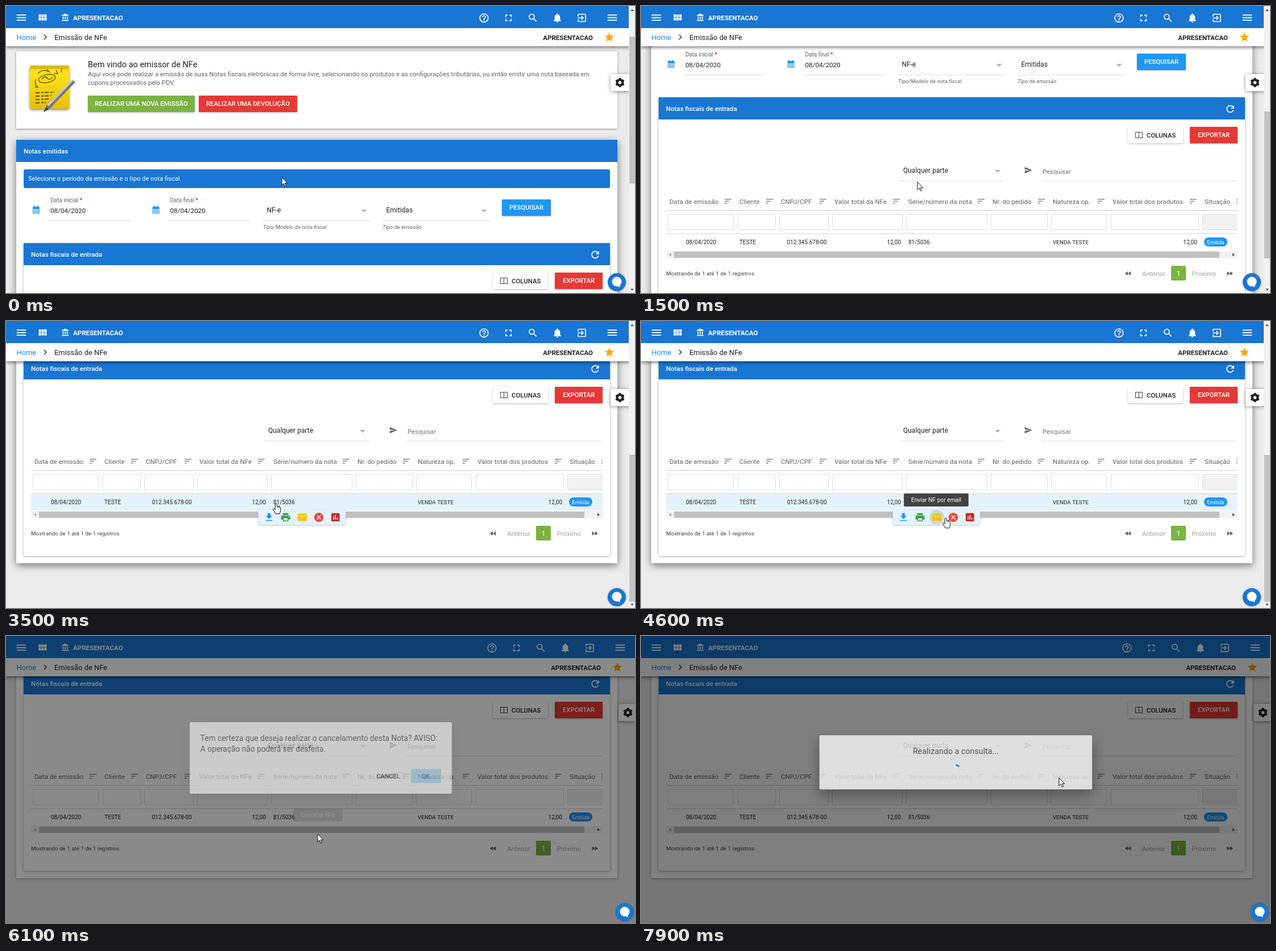
Animation of 1106 by 506 pixels, one loop 8 s. Source, as an HTML page with a canvas:

```html
<!DOCTYPE html>
<html lang="pt-BR">
<head>
<meta charset="utf-8">
<title>Emissão de NFe</title>
<style>
html, body { margin: 0; width: 100%; height: 100%; overflow: hidden; background: #ebebeb; }
canvas { display: block; }
</style>
</head>
<body>
<canvas id="stage" width="1106" height="506"></canvas>
<script>
const W = 1106, H = 506, LOOP = 8000, STEP = 100;
const stage = document.getElementById('stage').getContext('2d');
const layer = new OffscreenCanvas(W, H).getContext('2d');
let ctx = stage;
const BLUE = '#1976d2', SKY = '#2196f3', RED = '#e53935', GREEN = '#7cb342';
const INK = '#212121', GREY = '#616161', PALE = '#e3f2fd', LINE = '#dcdcdc';
const COMPANY = 'APRESENTACAO';

// 24-unit icon outlines
const ICONS = {
  menu: 'M3 18h18v-2H3zM3 13h18v-2H3zM3 6v2h18V6z',
  modules: 'M4 11h5V5H4zM4 18h5v-6H4zM10 18h5v-6h-5zM16 18h5v-6h-5zM10 11h5V5h-5zM16 5v6h5V5z',
  bank: 'M4 10v7h3v-7zM10 10v7h3v-7zM2 22h19v-3H2zM16 10v7h3v-7zM11.5 1L2 6v2h19V6z',
  help: 'M11 18h2v-2h-2v2zm1-16C6.48 2 2 6.48 2 12s4.48 10 10 10 10-4.48 10-10S17.52 2 12 2zm0 18c-4.41 0-8-3.59-8-8s3.59-8 8-8 8 3.59 8 8-3.59 8-8 8zm0-14c-2.21 0-4 1.79-4 4h2c0-1.1.9-2 2-2s2 .9 2 2c0 2-3 1.75-3 5h2c0-2.25 3-2.5 3-5 0-2.21-1.79-4-4-4z',
  full: 'M7 14H5v5h5v-2H7zM5 10h2V7h3V5H5zM17 17h-3v2h5v-5h-2zM14 5v2h3v3h2V5z',
  search: 'M15.5 14h-.79l-.28-.27C15.41 12.59 16 11.11 16 9.5 16 5.91 13.09 3 9.5 3S3 5.91 3 9.5 5.91 16 9.5 16c1.61 0 3.09-.59 4.23-1.57l.27.28v.79l5 4.99L20.49 19zM9.5 14C7.01 14 5 11.99 5 9.5S7.01 5 9.5 5 14 7.01 14 9.5 11.99 14 9.5 14z',
  bell: 'M12 22c1.1 0 2-.9 2-2h-4c0 1.1.89 2 2 2zm6-6v-5c0-3.07-1.64-5.64-4.5-6.32V4c0-.83-.67-1.5-1.5-1.5s-1.5.67-1.5 1.5v.68C7.63 5.36 6 7.92 6 11v5l-2 2v1h16v-1z',
  exit: 'M10.09 15.59L11.5 17l5-5-5-5-1.41 1.41L12.67 11H3v2h9.67zM19 3H5c-1.11 0-2 .9-2 2v4h2V5h14v14H5v-4H3v4c0 1.1.89 2 2 2h14c1.1 0 2-.9 2-2V5c0-1.1-.9-2-2-2z',
  chevron: 'M10 6L8.59 7.41 13.17 12l-4.58 4.59L10 18l6-6z',
  star: 'M12 17.27L18.18 21l-1.64-7.03L22 9.24l-7.19-.61L12 2 9.19 8.63 2 9.24l5.46 4.73L5.82 21z',
  refresh: 'M17.65 6.35C16.2 4.9 14.21 4 12 4c-4.42 0-7.99 3.58-7.99 8s3.57 8 7.99 8c3.73 0 6.84-2.55 7.73-6h-2.08c-.82 2.33-3.04 4-5.65 4-3.31 0-6-2.69-6-6s2.69-6 6-6c1.66 0 3.14.69 4.22 1.78L13 11h7V4z',
  send: 'M2 21L23 12 2 3v7l15 2-15 2z',
  download: 'M19 9h-4V3H9v6H5l7 7zM5 18v2h14v-2z',
  print: 'M19 8H5c-1.66 0-3 1.34-3 3v6h4v4h12v-4h4v-6c0-1.66-1.34-3-3-3zm-3 11H8v-5h8v5zm3-7c-.55 0-1-.45-1-1s.45-1 1-1 1 .45 1 1-.45 1-1 1zM18 3H6v4h12z',
  mail: 'M20 4H4c-1.1 0-2 .9-2 2v12c0 1.1.9 2 2 2h16c1.1 0 2-.9 2-2V6c0-1.1-.9-2-2-2zm0 4l-8 5-8-5V6l8 5 8-5z',
  cancel: 'M12 2C6.47 2 2 6.47 2 12s4.47 10 10 10 10-4.47 10-10S17.53 2 12 2zm5 13.59L15.59 17 12 13.41 8.41 17 7 15.59 10.59 12 7 8.41 8.41 7 12 10.59 15.59 7 17 8.41 13.41 12z',
  chart: 'M19 3H5c-1.1 0-2 .9-2 2v14c0 1.1.9 2 2 2h14c1.1 0 2-.9 2-2V5c0-1.1-.9-2-2-2zM9 17H7v-7h2zM13 17h-2V7h2zM17 17h-2v-4h2z',
  rewind: 'M12 18V6l-8.5 6zM20.5 18V6L12 12z',
  forward: 'M4 18l8.5-6L4 6zM12.5 6v12l8.5-6z'
};
for (const k in ICONS) ICONS[k] = new Path2D(ICONS[k]);
const ARROW = new Path2D('M0 0V14L3.2 11 5.6 16.2 7.7 15.2 5.4 10.3H9.8z');
const HAND = new Path2D('M-1.6 1.2Q0-1 1.6 1.2V6Q3.6 4.6 4 6.6 6 0 6 6.9 7.6 6 7.6 8.5V13Q7 15 6 18H-1Q-2 15-4.6 12-6.5 9-4.6 8.6L-1.6 10.5z');

function icon(name, x, y, size, color) {
  ctx.save();
  ctx.translate(x - size / 2, y - size / 2);
  ctx.scale(size / 24, size / 24);
  ctx.fillStyle = color;
  ctx.fill(ICONS[name], 'evenodd');
  ctx.restore();
}
function rect(x, y, x2, y2, color, r = 0) {
  ctx.fillStyle = color;
  ctx.beginPath();
  ctx.roundRect(x, y, x2 - x, y2 - y, r);
  ctx.fill();
}
function raised(x, y, x2, y2, color, r = 1, blur = 4, dy = 1, alpha = .35) {
  ctx.save();
  ctx.shadowColor = `rgba(0,0,0,${alpha})`;
  ctx.shadowBlur = blur;
  ctx.shadowOffsetY = dy;
  rect(x, y, x2, y2, color, r);
  ctx.restore();
}
function box(x, y, x2, y2, color) {
  ctx.strokeStyle = color;
  ctx.lineWidth = 1;
  ctx.strokeRect(x + .5, y + .5, x2 - x - 1, y2 - y - 1);
}
// y is the middle of the capitals
function text(s, x, y, size, color = INK, weight = 400, align = 'left') {
  ctx.font = `${weight} ${size}px Roboto, sans-serif`;
  ctx.textAlign = align;
  ctx.fillStyle = color;
  ctx.fillText(s, x, Math.round(y + size * .356));
}
function disc(x, y, r, color) {
  ctx.fillStyle = color;
  ctx.beginPath();
  ctx.arc(x, y, r, 0, 7);
  ctx.fill();
}
function poly(color, ...p) {
  ctx.fillStyle = color;
  ctx.beginPath();
  for (let i = 0; i < p.length; i += 2) ctx.lineTo(p[i], p[i + 1]);
  ctx.fill();
}
const caret = (x, y) => poly('#b5b5b5', x - 5, y - 2.5, x + 5, y - 2.5, x, y + 2.5);

// linear track through [time, ...values] keys
function track(keys, t) {
  let i = 0;
  while (i < keys.length - 1 && t >= keys[i + 1][0]) i++;
  const a = keys[i], b = keys[i + 1];
  if (!b || t <= a[0]) return a.slice(1);
  const p = (t - a[0]) / (b[0] - a[0]);
  return a.slice(1).map((v, k) => v + (b[k + 1] - v) * p);
}
const SCROLL = [[0, 0], [700, 0], [800, 18], [1200, 162], [1600, 288], [1700, 288], [1800, 354]];
const POINTER = [[0, 485, 302], [700, 485, 302], [1000, 486, 310], [1700, 486, 310], [1800, 486, 315],
  [2600, 486, 315], [2900, 477, 318], [3400, 477, 318], [3600, 473.5, 325], [3700, 473.5, 325],
  [4000, 463, 345], [4200, 482, 347], [4600, 536, 347], [5100, 548, 349], [6400, 548, 349],
  [6600, 629, 325], [6700, 629, 325], [7400, 735, 249.5]];
const SHADE = [[5800, 0], [5900, .02], [6000, .26], [6100, .46], [6200, .5]];
const ASK = [[5900, 0, .8], [6000, .2, .88], [6100, .56, .96], [6200, .88, .99], [6300, 1, 1],
  [7600, 1, 1], [7700, .6, .98], [7800, .1, .9], [7900, 0, .8]];

function notepad() {
  ctx.save();
  ctx.shadowColor = 'rgba(0,0,0,.5)';
  ctx.shadowBlur = 5;
  ctx.shadowOffsetY = 2;
  const g = ctx.createLinearGradient(0, 104, 0, 181);
  g.addColorStop(0, '#f5d90f');
  g.addColorStop(.2, '#fce21c');
  g.addColorStop(1, '#e8bd08');
  rect(42, 105, 111, 181, g, 2);
  ctx.restore();
  rect(43, 105, 110, 111, '#d8b90e', 1);
  ctx.strokeStyle = '#5d5310';
  ctx.lineWidth = 1.3;
  ctx.beginPath();
  ctx.ellipse(72, 128, 15, 7, -.2, 0, 6.3);
  ctx.moveTo(63, 129); ctx.quadraticCurveTo(70, 121, 73, 128); ctx.quadraticCurveTo(77, 132, 82, 125);
  ctx.moveTo(56, 119); ctx.quadraticCurveTo(65, 110, 76, 116); ctx.lineTo(72, 112);
  ctx.moveTo(88, 113); ctx.lineTo(91, 119); ctx.lineTo(84, 119);
  ctx.moveTo(98, 110); ctx.lineTo(97, 117);
  ctx.moveTo(53, 129); ctx.quadraticCurveTo(48, 137, 56, 143); ctx.lineTo(51, 143);
  ctx.stroke();
  ctx.lineWidth = 2;
  ctx.setLineDash([7, 3, 4, 2]);
  ctx.beginPath();
  for (let i = 0; i < 4; i++) { ctx.moveTo(52, 153 + i * 6); ctx.lineTo(85 - i * 5, 152 + i * 6); }
  ctx.stroke();
  ctx.setLineDash([]);
  poly('#74777a', 117, 130, 122, 134, 78, 180, 66, 187, 71, 175);
  poly('#c3c6c8', 116, 130, 119, 131, 75, 177, 72, 174);
  poly('#333', 71, 179, 75, 182, 66, 187);
}

function calendar(x, y) {
  rect(x - 6, y - 5, x + 6, y + 7, SKY, 1);
  for (let i = 0; i < 12; i++) {
    const cx = x - 5 + (i % 4) * 2.7, cy = y - 1 + (i / 4 | 0) * 2.6;
    rect(cx, cy, cx + 1.9, cy + 1.8, '#fff');
  }
  rect(x - 4, y - 7, x - 2, y - 3, SKY, 1);
  rect(x + 2, y - 7, x + 4, y - 3, SKY, 1);
}

function dateField(x, label) {
  calendar(x - 25, 359);
  text(label, x, 342.5, 10, GREY);
  const w = ctx.measureText(label + ' ').width;
  text('*', x + w, 342.5, 11, '#f00');
  text('08/04/2020', x, 361, 11.7);
  rect(x - 3, 378, x + 142, 379, LINE);
}
function select(x, x2, y, value, hint) {
  text(value, x + 6.5, y, 12);
  caret(x2 - 11.5, y + 1.5);
  rect(x, y + 18, x2, y + 19, LINE);
  if (hint) {
    ctx.font = 'italic 9.6px Roboto, sans-serif';
    ctx.textAlign = 'left';
    ctx.fillStyle = GREY;
    ctx.fillText(hint, x, y + 33);
  }
}
function button(x, y, x2, label, color) {
  raised(x, y, x2, y + 29, color, 1, 3, 1, .3);
  text(label, (x + x2) / 2, y + 14, 11.3, '#fff', 500, 'center');
}

const COLUMNS = [
  ['Data de emissão', 50, 147, 47, 163], ['Cliente', 173, 220, 170, 237], ['CNPJ/CPF', 246, 314, 243, 330],
  ['Valor total da NFe', 340, 443, 336, 460], ['Série/número da nota', 470, 592, 466, 609],
  ['Nr. do pedido', 618, 698, 615, 715], ['Natureza op.', 724, 803, 721, 819],
  ['Valor total dos produtos', 829, 965, 826, 981], ['Situação', 991, 1047, 987, 1060]
];

function table(lit) {
  ctx.save();
  ctx.beginPath();
  ctx.rect(44, 580, 1005, 140);
  ctx.clip();
  for (const [name, x, sx, x1, x2] of COLUMNS) {
    text(name, x, 601.5, 11.6, GREY);
    [12, 8, 4].forEach((w, i) => rect(sx, 597 + i * 3.5, sx + w, 598.3 + i * 3.5, '#757575'));
    if (x1 > 980) rect(x1, 624, x2, 652, '#f1f1f1');
    box(x1, 624, x2, 652, LINE);
  }
  rect(44, 617, 1050, 618, '#d0d0d0');
  rect(44, 658, 1050, 659, '#d4d4d4');
  if (lit) rect(44, 659, 1050, 688, PALE);
  const y = 673;
  text('08/04/2020', 79, y, 10);
  text('TESTE', 173, y, 10);
  text('012.345.678-00', 326.5, y, 10, INK, 400, 'right');
  text('12,00', 457, y, 10, INK, 400, 'right');
  text('81/5036', 470, y, 10);
  text('VENDA TESTE', 724, y, 9.9);
  text('12,00', 978, y, 10, INK, 400, 'right');
  rect(990, 665, 1031, 681, SKY, 8);
  text('Emitida', 1010.5, y + .5, 9, '#fff', 400, 'center');
  rect(44, 689, 1050, 702, '#f1f1f1');
  rect(58, 690, 1017, 701, '#c1c1c1');
  poly('#a3a3a3', 53, 692.5, 53, 698.5, 49, 695.5);
  poly('#505050', 1040, 692.5, 1040, 698.5, 1044, 695.5);
  ctx.restore();
}

function page(lit, lifted) {
  raised(18, 80, 1075, 216, '#fff', 1, 4, 1);
  notepad();
  text('Bem vindo ao emissor de NFe', 144, 103, 14.5);
  text('Aqui você pode realizar a emissão de suas Notas fiscais eletrônicas de forma livre, selecionando os produtos e as configurações tributárias, ou então emitir uma nota baseada em', 144, 120.5, 11.15, GREY);
  text('cupons processados pelo PDV.', 144, 135, 11.15, GREY);
  button(144, 158, 332, 'REALIZAR UMA NOVA EMISSÃO', GREEN);
  button(339, 158, 512, 'REALIZAR UMA DEVOLUÇÃO', RED);

  if (lifted) raised(18, 236, 1075, 781, '#fff', 1, 14, 4, .5);
  else raised(18, 236, 1075, 781, '#fff');
  rect(18, 236, 1075, 275, BLUE);
  text('Notas emitidas', 31, 256, 11.5, '#fff', 500);
  rect(31, 288, 1062, 321, BLUE, 3);
  text('Selecione o período da emissão e o tipo de nota fiscal.', 39, 304.5, 11.15, '#fff');
  dateField(78, 'Data inicial');
  dateField(288.5, 'Data final');
  select(452, 641, 360, 'NF-e', 'Tipo/Modelo da nota fiscal');
  select(662, 852, 360, 'Emitidas', 'Tipo de emissão');
  button(872, 341, 958, 'PESQUISAR', SKY);

  raised(31, 418, 1062, 768, '#fff');
  rect(31, 418, 1062, 457, BLUE);
  text('Notas fiscais de entrada', 44, 438, 11.5, '#fff', 500);
  icon('refresh', 1036, 438.5, 20, '#fff');
  raised(856, 470, 953, 499, '#fff', 1, 3, 1, .3);
  box(869, 479, 882, 490, '#444');
  rect(875, 480, 876, 489, '#444');
  text('COLUNAS', 889, 484.5, 11.4, INK, 500);
  button(965, 470, 1049, 'EXPORTAR', RED);
  select(454.5, 638.5, 547, 'Qualquer parte');
  icon('send', 681, 546.5, 15, '#666');
  text('Pesquisar', 706, 549, 11.3, '#707070');
  rect(703, 565, 1048, 566, LINE);
  table(lit);
  text('Mostrando de 1 até 1 de 1 registros', 44, 728.5, 9.85, '#424242');
  icon('rewind', 856, 728.5, 15, '#666');
  text('Anterior', 881, 728.5, 11.5, '#9e9e9e');
  rect(932, 715, 958, 741, GREEN, 2);
  text('1', 945, 728.5, 12, '#fff', 400, 'center');
  text('Próximo', 968.5, 728.5, 11.5, '#9e9e9e');
  icon('forward', 1035.5, 728.5, 15, '#666');
}

function gear(x, y) {
  ctx.fillStyle = INK;
  ctx.beginPath();
  for (let i = 0; i < 24; i++) {
    const a = (i - .5) * Math.PI / 12, r = i % 4 < 2 ? 8.4 : 6.8;
    ctx.lineTo(x + Math.sin(a) * r, y + Math.cos(a) * r);
  }
  ctx.closePath();
  ctx.moveTo(x + 2.7, y);
  ctx.arc(x, y, 2.7, 0, 6.3);
  ctx.fill('evenodd');
}

function chrome(dx) {
  raised(0, 39, W, 71, '#fff', 0, 6, 2, .55);
  rect(0, 0, W, 39, BLUE);
  icon('menu', 27, 20.5, 22, '#fff');
  icon('modules', 64, 20.5, 20, '#fff');
  icon('bank', 104.5, 20, 15, '#fff');
  text(COMPANY, 118, 20.5, 11.5, '#fff', 700);
  ['help', 'full', 'search', 'bell', 'exit'].forEach((n, i) => icon(n, 840.5 + i * 43 + dx, 21, 19.5, '#fff'));
  icon('menu', 1066 + dx, 20.5, 22, '#fff');
  text('Home', 18.5, 55, 12.9, '#1e88e5');
  icon('chevron', 69, 55, 19, '#444');
  text('Emissão de NFe', 85, 55, 12.9);
  text(COMPANY, 1032 + dx, 55.5, 11.5, INK, 700, 'right');
  icon('star', 1061 + dx, 55, 20, '#ffa807');
  raised(1063 + dx, 120, 1125, 150, '#fff', 2, 6, 1, .45);
  gear(1079.5 + dx, 135);
}

function scrollbar(scroll) {
  rect(1095, 0, W, H, '#f1f1f1');
  const y = Math.round(54 + scroll * .513);
  rect(1096, y, W, y + 259, '#c1c1c1');
  poly('#505050', 1098, 9, 1104, 9, 1101, 5.5);
  poly('#505050', 1098, 498.5, 1104, 498.5, 1101, 502);
}

function actions(left, hover) {
  raised(left, 333, left + 154, 359.5, PALE, 4, 3, 1, .25);
  const set = [['download', SKY], ['print', '#43a047'], ['mail', '#ffc107'], ['cancel', '#f44336'], ['chart', '#c62828']];
  set.forEach(([name, color], i) => {
    const x = left + 19 + i * 29.2;
    if (i === hover) disc(x, 346, 13, '#c9d8e3');
    icon(name, x, 346, 19.5, color);
  });
}
function tooltip(label, x, alpha = 1) {
  ctx.save();
  ctx.globalAlpha = alpha;
  ctx.font = '400 10.2px Roboto, sans-serif';
  const w = ctx.measureText(label).width / 2 + 12.8;
  rect(x - w, 304, x + w, 327, '#424242', 2);
  text(label, x, 315.5, 10.2, '#fff', 400, 'center');
  ctx.restore();
}

// painted opaque on its own layer, then faded as a whole
function dialog(cy, h, [alpha, scale], shadow, content) {
  if (alpha <= 0) return;
  ctx = layer;
  ctx.clearRect(0, 0, W, H);
  ctx.save();
  ctx.translate(553.5, cy);
  ctx.scale(scale, scale);
  ctx.translate(-553.5, -cy);
  raised(313.5, cy - h / 2, 793.5, cy + h / 2, '#fff', 2, 24, 9, shadow);
  content();
  ctx.restore();
  ctx = stage;
  ctx.globalAlpha = alpha;
  ctx.drawImage(layer.canvas, 0, 0);
  ctx.globalAlpha = 1;
}
function question() {
  text('Tem certeza que deseja realizar o cancelamento desta Nota? AVISO:', 333, 179, 14.3, '#444');
  text('A operação não poderá ser desfeita.', 333, 198.5, 14.3, '#444');
  text('CANCEL', 677, 248, 11.3, '#333', 500, 'center');
  rect(718.5, 235, 774, 261, '#aee0fb', 1);
  text('OK', 746, 248, 11.3, '#1e88e5', 500, 'center');
}
function waiting() {
  text('Realizando a consulta...', 553.5, 203, 14.3, '#444', 400, 'center');
  ctx.strokeStyle = '#2f7ff0';
  ctx.lineWidth = 3;
  ctx.beginPath();
  ctx.arc(552.5, 239, 11.5, -1.5, -.9);
  ctx.stroke();
}

function chat(x) {
  ctx.save();
  ctx.shadowColor = 'rgba(0,0,0,.3)';
  ctx.shadowBlur = 3;
  disc(x, 487, 16, BLUE);
  ctx.restore();
  disc(x, 486, 8.5, '#fff');
  poly('#fff', x - 1, 492, x + 6, 490, x + 5, 496);
}
function pointer(x, y, hand) {
  ctx.save();
  ctx.translate(x, y);
  ctx.fillStyle = '#fff';
  ctx.strokeStyle = '#111';
  ctx.lineWidth = 1;
  const p = hand ? HAND : ARROW;
  ctx.fill(p);
  ctx.stroke(p);
  ctx.restore();
}

function draw(t) {
  const scroll = Math.round(track(SCROLL, t)[0]);
  const [x, y] = track(POINTER, t).map(Math.round);
  const modal = t >= 6000, dx = modal ? 14 : 0;
  rect(0, 0, W, H, '#ebebeb');
  ctx.save();
  ctx.translate(0, -scroll);
  page(t >= 2100 && !modal, !modal);
  ctx.restore();
  chrome(dx);
  if (!modal) scrollbar(scroll);
  if (t >= 1800 && !modal) {
    const left = Math.round(track(POINTER, Math.min(t, 3600))[0]) - 31.5;
    actions(left, y >= 338 ? Math.floor((x - left - 19) / 29.3 + .4) : -1);
    if (t >= 4300 && t < 4800) tooltip('Enviar NF por email', 519);
    if (t >= 4800) tooltip('Cancelar NFe', 548.5);
  }
  rect(0, 0, W, H, `rgba(0,0,0,${track(SHADE, t)[0]})`);
  if (modal && t < 6200) tooltip('Cancelar NFe', 548.5, t < 6100 ? .55 : .2);
  dialog(215, 131, track(ASK, t), .15, question);
  if (t >= 7900) dialog(222.7, 95.6, [.74, .999], .5, waiting);
  chat(1074 + dx);
  pointer(x, y, (t >= 1800 && t < 5900) || (t >= 7200 && t < 7700));
}

function loop(now) {
  draw(Math.floor(now % LOOP / STEP) * STEP);
  requestAnimationFrame(loop);
}
requestAnimationFrame(loop);
</script>
</body>
</html>
```
